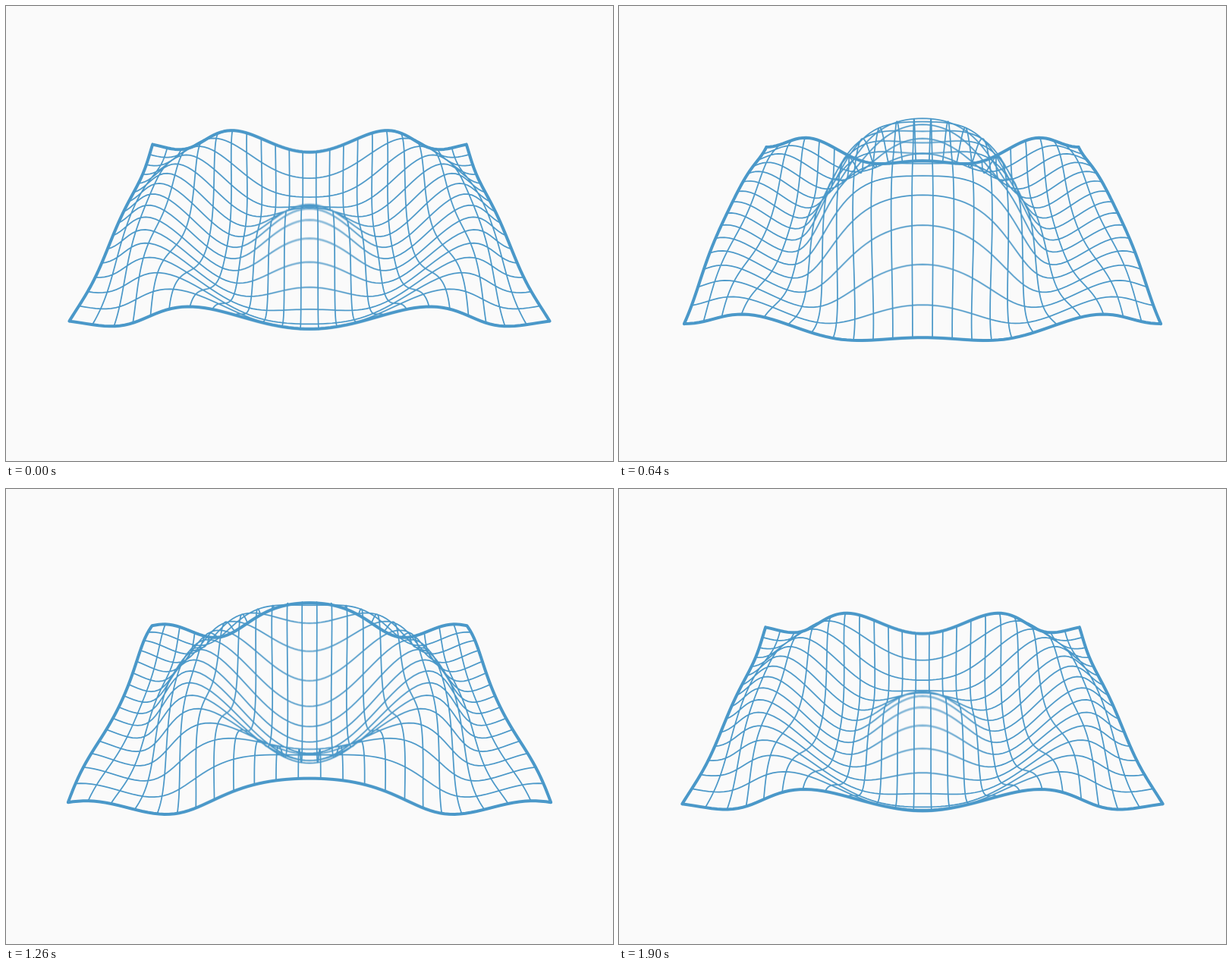
An HTML page with a canvas for the animation above (1.92 s loop, 800x600 px).

```html
<!DOCTYPE html>
<html lang="en">
<head>
<meta charset="utf-8">
<title>Ripple mesh</title>
<style>
  html, body { margin: 0; height: 100%; overflow: hidden; background: #fafafa; }
  canvas { display: block; }
</style>
</head>
<body>
<canvas id="stage" width="800" height="600"></canvas>
<script>
const LOOP = 1920, STEP = 20;
const SAMPLES = 6, SHUTTER = 0.5;            // motion blur, in steps
const COLS = 23, ROWS = 15, HALF_W = 250, HALF_D = HALF_W * ROWS / COLS;
const CAMERA = 568, TILT = 0.752, CX = 400, CY = 275;
const SIN = Math.sin(TILT), COS = Math.cos(TILT), RAD = Math.PI / 180;

const stage = document.getElementById('stage').getContext('2d');
const layer = document.createElement('canvas');
layer.width = 800;
layer.height = 600;
const ctx = layer.getContext('2d');

// Ring wave: strength and delay both follow the squared radius
function height(x, y, time) {
  const r2 = x * x + y * y;
  const phase = time / LOOP * 360 - 89 - 0.00614 * r2;
  return 122 * Math.exp(-3.6e-5 * r2) * Math.cos(phase * RAD);
}

function project(x, y, time) {
  const z = height(x, y, time);
  const scale = CAMERA / (CAMERA + y * COS - z * SIN);
  return [CX + x * scale, CY - (y * SIN + z * COS) * scale];
}

function trace(x0, y0, x1, y1, time) {
  const n = 90;
  for (let i = 0; i <= n; i++) {
    const k = i / n;
    const p = project(x0 + (x1 - x0) * k, y0 + (y1 - y0) * k, time);
    if (i) ctx.lineTo(...p); else ctx.moveTo(...p);
  }
}

function stroke(width, cols, rows, time) {
  ctx.beginPath();
  ctx.lineWidth = width;
  for (const c of cols) {
    const x = HALF_W * (2 * c / COLS - 1);
    trace(x, -HALF_D, x, HALF_D, time);
  }
  for (const r of rows) {
    const y = HALF_D * (2 * r / ROWS - 1);
    trace(-HALF_W, y, HALF_W, y, time);
  }
  ctx.stroke();
}

const inner = count => Array.from({ length: count - 1 }, (_, i) => i + 1);
const innerCols = inner(COLS), innerRows = inner(ROWS);

function drawMesh(time) {
  ctx.fillStyle = '#fafafa';
  ctx.fillRect(0, 0, 800, 600);
  ctx.strokeStyle = '#4a98c9';
  ctx.lineCap = ctx.lineJoin = 'round';
  stroke(1.7, innerCols, innerRows, time);
  stroke(4, [0, COLS], [0, ROWS], time);
}

function render(time) {
  for (let i = 0; i < SAMPLES; i++) {
    drawMesh(time + ((i + 0.5) / SAMPLES - 0.5) * SHUTTER * STEP);
    stage.globalAlpha = 1 / (i + 1);         // running average
    stage.drawImage(layer, 0, 0);
  }
}

let start, shown;
function tick() {
  const now = performance.now();
  start ??= now;
  const time = Math.floor((now - start) % LOOP / STEP) * STEP;
  if (time !== shown) render(shown = time);
  requestAnimationFrame(tick);
}
tick();
</script>
</body>
</html>
```
